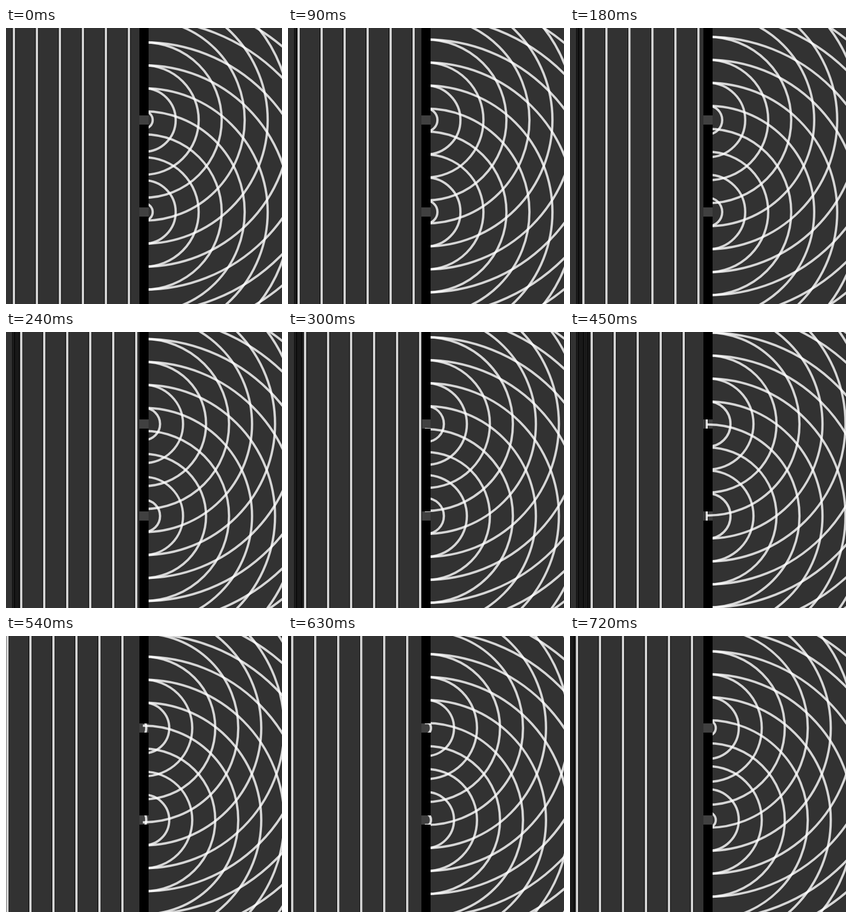
Animation, 540 px wide and 540 px high, one loop 750 ms. Source, as an HTML page with a canvas:

```html
<!DOCTYPE html>
<html lang="en">
<head>
<meta charset="utf-8">
<title>Double slit</title>
<style>
  html, body { margin: 0; width: 100%; height: 100%; overflow: hidden; background: #323232; }
  canvas { display: block; width: 540px; height: 540px; }
</style>
</head>
<body>
<canvas id="stage" width="540" height="540"></canvas>
<script>
const ctx = document.getElementById('stage').getContext('2d');
const SIZE = 540, LOOP = 750, TICK = 30, SHIFT = 1.8;
const GAP = 45, START = 15.5, LINE = 4.5;
const MID = 270, WALL = 18, SLITS = [180, 360];
const WAVE = 'rgba(255,255,255,0.8)';

function box(color, x, y, w, h) {
  ctx.fillStyle = color;
  ctx.fillRect(x, y, w, h);
}

const edge = x => box('#000', Math.floor(x), 0, 1, SIZE);

function plane(x) {
  edge(x - 3);
  edge(x + 2.5);
  box(WAVE, x - LINE / 2, 0, LINE, SIZE);
}

// Thin dark marks left behind by the leftmost front
function trail(step) {
  const lead = START - (step >= 16 ? GAP : 0);
  for (let i = 0; i < step; i++) edge(lead + i * SHIFT - 3);
}

function ripple(y, r) {
  ctx.beginPath();
  ctx.ellipse(MID, y, r, Math.max(r, 12), 0, -Math.PI / 2, Math.PI / 2);
  ctx.stroke();
}

function wall() {
  const x = MID - WALL / 2;
  let top = 0;
  for (const y of [...SLITS, SIZE + WALL]) {
    box('#000', x, top, WALL, y - WALL / 2 - top);
    top = y + WALL / 2;
  }
}

function draw(step) {
  const first = START + step * SHIFT;
  box('#323232', 0, 0, SIZE, SIZE);
  box('#404040', MID - WALL / 2, 0, WALL, SIZE);
  trail(step);
  for (let x = first - GAP; x < MID; x += GAP) plane(x);

  ctx.strokeStyle = WAVE;
  ctx.lineWidth = LINE;
  ctx.lineCap = 'square';
  for (let r = first % GAP; r < 480; r += GAP) {
    for (const y of SLITS) ripple(y, r + 1.5);
  }
  wall();
}

let last = -1;
function frame() {
  const step = Math.floor((performance.now() % LOOP) / TICK);
  if (step !== last) draw(last = step);
  requestAnimationFrame(frame);
}
frame();
</script>
</body>
</html>
```
